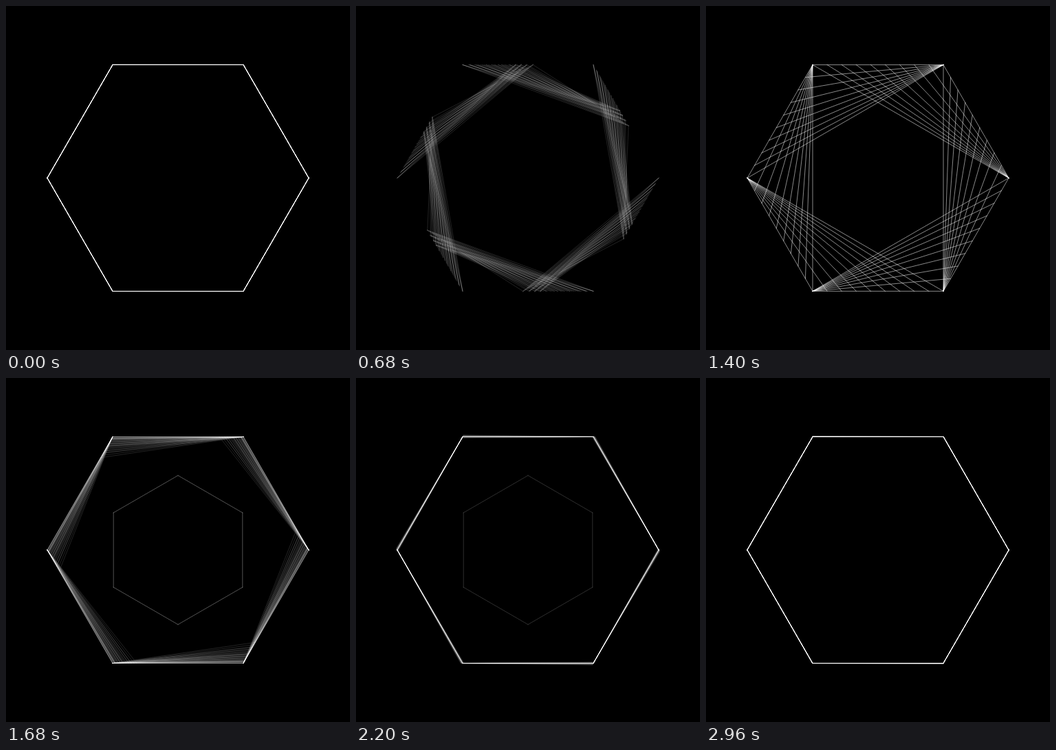
Recreate the animation shown at these times as an HTML page with a canvas. Size 500 by 500 pixels, loop 3 s.

```html
<!DOCTYPE html>
<html>
<head>
<meta charset="utf-8">
<style>
html, body { margin: 0; width: 100%; height: 100%; overflow: hidden; background: #000; }
canvas { display: block; }
</style>
</head>
<body>
<canvas id="stage" width="500" height="500"></canvas>
<script>
const LOOP = 3000, FAN = 1400, SNAP = 1430;
const COPIES = 10, SAMPLES = 4, RADIUS = 190;
const out = document.getElementById('stage').getContext('2d');
const layer = document.createElement('canvas');
layer.width = layer.height = 500;
const ctx = layer.getContext('2d');

const corner = (i, r = RADIUS, turn = 0) => {
  const a = i * Math.PI / 3 + turn;
  return [250 + r * Math.cos(a), 250 + r * Math.sin(a)];
};
const mix = (a, b, p) => a.map((v, i) => v + (b[i] - v) * p);

function ease(x, g = 5.5) {
  x = Math.min(1, x);
  return x < .5 ? .5 * (2 * x) ** g : 1 - .5 * (2 - 2 * x) ** g;
}

// Distance the trailing ends still have to go: released at 1, ringing down to 0.
const spring = s => .85 * Math.exp(-3.9 * s) * Math.cos(17.55 * s + .5);

function line(a, b) {
  ctx.beginPath();
  ctx.moveTo(...a);
  ctx.lineTo(...b);
  ctx.stroke();
}

function drawScene(t) {
  ctx.globalAlpha = 1;
  ctx.fillStyle = '#000';
  ctx.fillRect(0, 0, 500, 500);
  ctx.strokeStyle = '#fff';
  ctx.lineWidth = 1;
  ctx.lineCap = 'square';

  const lead = ease(t / FAN);
  const rest = spring((t - SNAP) / 1000);
  ctx.globalAlpha = .52;
  for (let k = 0; k < COPIES; k++) {
    const share = k / (COPIES - 1);
    const trail = t <= SNAP ? lead * share : 1 - rest * (1 - share);
    for (let j = 0; j < 6; j++) {
      line(mix(corner(j), corner(j + 1), trail), mix(corner(j + 1), corner(j + 2), lead));
    }
  }

  // Afterglow of the star's inner outline.
  const glow = .38 * (1 - (t - SNAP) / 1400);
  if (t > SNAP && glow > 0) {
    ctx.globalAlpha = glow;
    for (let j = 0; j < 6; j++) {
      line(corner(j, 108.3, Math.PI / 6), corner(j + 1, 108.3, Math.PI / 6));
    }
  }
}

function frame(now) {
  const t = Math.floor(now / 40) * 40;
  out.globalCompositeOperation = 'source-over';
  out.globalAlpha = 1;
  out.fillRect(0, 0, 500, 500);
  out.globalCompositeOperation = 'lighter';
  out.globalAlpha = 1 / SAMPLES;
  // Motion blur: average a few moments around the current one.
  for (let i = 0; i < SAMPLES; i++) {
    drawScene((t + i * 12 - 6 + LOOP) % LOOP);
    out.drawImage(layer, 0, 0);
  }
}

const start = performance.now();
function tick() {
  frame((performance.now() - start) % LOOP);
  requestAnimationFrame(tick);
}
tick();
</script>
</body>
</html>
```
